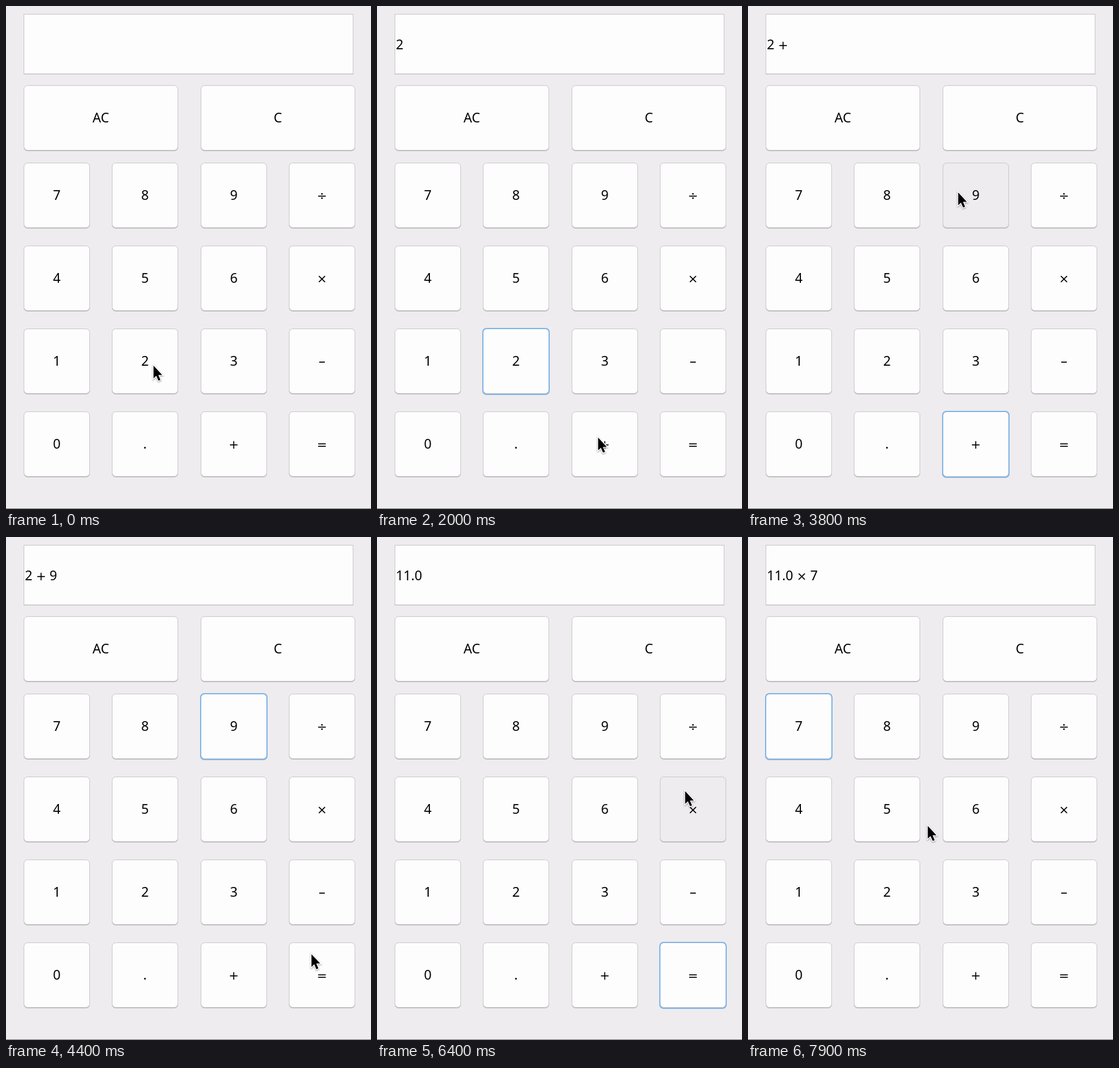
An HTML page for the animation above (8000 ms loop, 600 by 825 pixels).

```html
<!DOCTYPE html>
<html lang="en">
<head>
<meta charset="utf-8">
<title>Calculator</title>
<style>
  html, body { margin: 0; width: 100%; height: 100%; overflow: hidden; background: #eeecee; }
  svg { display: block; }
  text { font: 21.8px "Noto Sans", sans-serif; white-space: pre; }
  .op { font: 20px "DejaVu Sans", sans-serif; }
  .label { text-anchor: middle; }
  .shade { fill: #b9b7b9; }
  .face { fill: #fefdfe; stroke: #cac8ca; }
  .ring { fill: none; stroke-width: 2; }
  .focus .ring { stroke: #82b5e6; }
  .pressed .face { fill: #eeecee; }
</style>
</head>
<body>
<svg width="600" height="825">
  <rect x="29.5" y="13.5" width="541" height="98" fill="#fefdfe" stroke="#c8c6c8"/>
  <path d="M29 111.5H571" stroke="#b2b0b2"/>
  <text id="display" x="31" y="70.7"></text>
  <g id="keys"></g>
  <path d="M0 824.5H600" stroke="#777"/>
  <path id="cursor" d="M.5 .8V21.8L5 17.5L8.6 25.6L11.9 24.2L8.4 16.2H14.8Z" fill="#000" stroke="#fff"
    stroke-width="2.8" paint-order="stroke" style="filter:drop-shadow(0 1.5px 1.2px #0006)"/>
</svg>
<script>
const LOOP = 8000, STEP = 100;
const $ = id => document.getElementById(id);
const keys = {};

const markup = text => text.replace(/[+×÷=]/g, '<tspan class="op">$&</tspan>');

function addKey(name, x, y, w = 109) {
  $('keys').insertAdjacentHTML('beforeend', `<g>
    <rect class="shade" x="${x}" y="${y + 1}" width="${w}" height="107" rx="6.5"/>
    <rect class="face" x="${x + .5}" y="${y + .5}" width="${w - 1}" height="106" rx="6"/>
    <rect class="ring" x="${x}" y="${y}" width="${w}" height="108" rx="6"/>
    <text class="label" x="${x + w / 2}" y="${y + 61}">${markup(name)}</text></g>`);
  keys[name] = $('keys').lastElementChild;
}

addKey('AC', 29, 130, 254);
addKey('C', 320, 130, 254);
['789÷', '456×', '123–', '0.+='].forEach((row, r) =>
  [...row].forEach((name, c) => addKey(name, 29 + Math.round(c * 145.3), 257 + r * 136)));

// press time, key, display after release
const clicks = [
  [1100, '2', '2'], [2300, '+', '2 +'], [3800, '9', '2 + 9'],
  [4700, '=', '11.0'], [6400, '×', '11.0 ×'], [7500, '7', '11.0 × 7']
];

// pointer moves: start and end time, end point, bend of a curved move
const home = [242, 589];
const moves = [
  [1400, 2000, [363, 707]],
  [2500, 3100, [345, 305], [257, 361]],
  [3900, 4600, [519, 709], [411, 556]],
  [5100, 6000, [492, 336], [429, 620]],
  [6000, 6300, [506, 416]],
  [6700, 7400, [58, 312]],
  [7700, 7900, [295, 473]]
];

function pointerAt(t) {
  let at = home;
  for (const [start, end, to, bend] of moves) {
    if (t <= start) break;
    const k = 1 - (1 - Math.min(1, (t - start) / (end - start))) ** 2;
    at = at.map((a, i) => {
      const b = bend ? bend[i] : (a + to[i]) / 2;
      return a * (1 - k) ** 2 + 2 * b * k * (1 - k) + to[i] * k * k;
    });
  }
  return at;
}

function draw(now) {
  const t = Math.floor(now % LOOP / STEP) * STEP;
  const done = clicks.filter(c => t >= c[0] + STEP).pop();
  const held = clicks.find(c => t >= c[0] && t < c[0] + STEP);
  for (const name in keys) {
    keys[name].classList.toggle('focus', done?.[1] === name);
    keys[name].classList.toggle('pressed', held?.[1] === name);
  }
  $('display').innerHTML = done ? markup(done[2]) : '';
  $('cursor').setAttribute('transform', `translate(${pointerAt(t)})`);
}

const start = performance.now();
function tick() {
  draw(performance.now() - start);
  requestAnimationFrame(tick);
}
tick();
</script>
</body>
</html>
```
